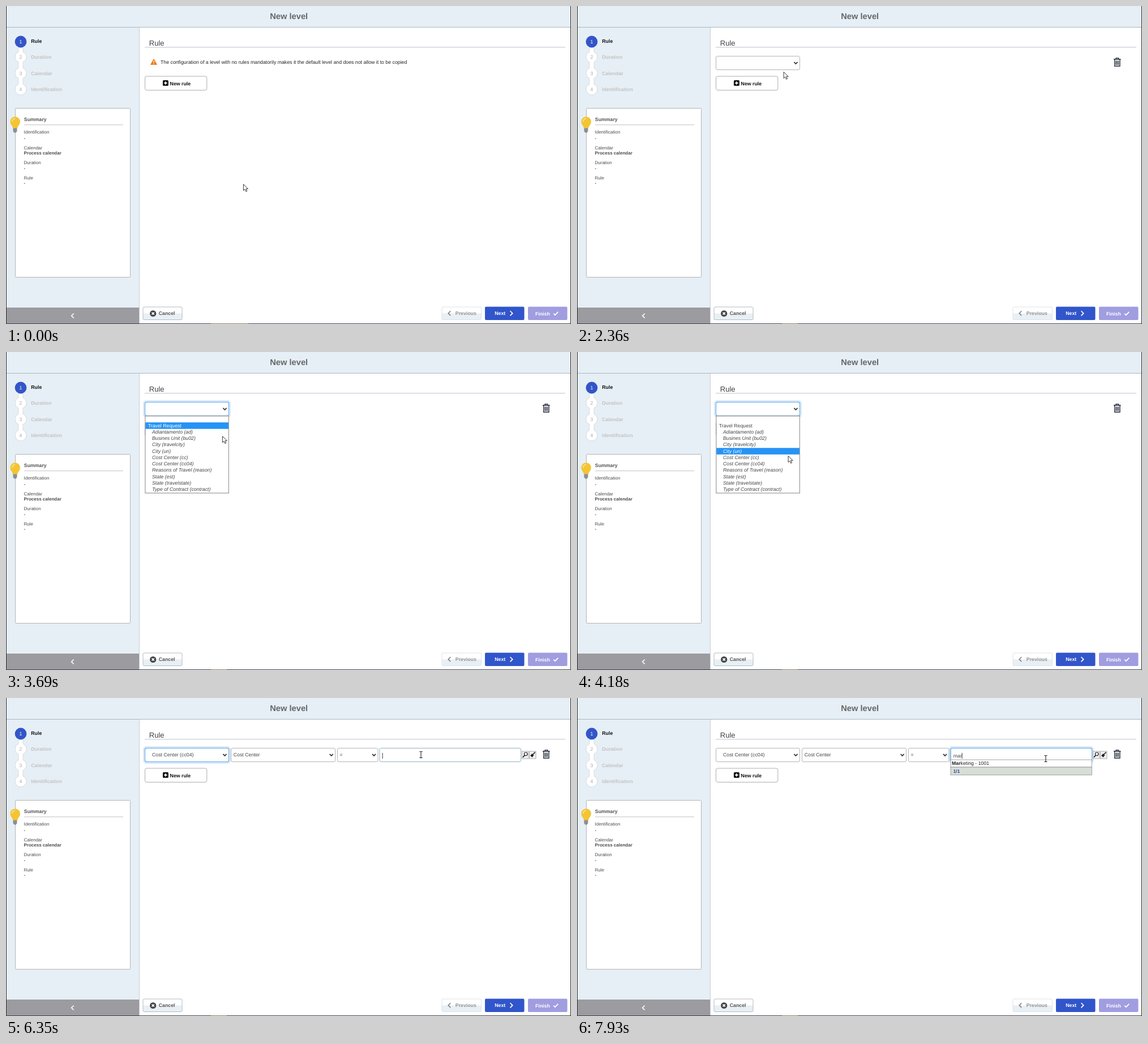
An HTML page for the animation above (7990 ms loop, 998 by 561 pixels).

```html
<!DOCTYPE html>
<html lang="en">
<head>
<meta charset="utf-8">
<title>New level</title>
<style>
  html, body { margin: 0; width: 100%; height: 100%; overflow: hidden; background: #fff; }
  svg { display: block; }
  text { font: 8.76px "Liberation Sans", Arial, sans-serif; fill: #444; text-rendering: geometricPrecision; white-space: pre; }
  .b { font-weight: bold; }
  .s { font-size: 8px; fill: #4c4c4c; }
  .off { fill: #c3c3c3; }
  .mid { text-anchor: middle; }
  .box { fill: #fff; stroke: #b4b4b4; }
  .line { fill: none; stroke-width: 1.7; }
  .ring { fill: none; stroke: #5fa8e8; }
  #list text { font-style: italic; }
</style>
</head>
<body>
<svg width="998" height="561" viewBox="0 0 998 561">
  <defs>
    <linearGradient id="soft" x2="0" y2="1">
      <stop offset=".48" stop-color="#fff"/><stop offset=".52" stop-color="#e8f0f6"/>
    </linearGradient>
    <path id="chev" class="line" d="M-3 -1.6L0 1.6L3 -1.6" stroke="#333"/>
    <g id="glow">
      <path id="arrow" d="M.4 .4V11.6L3 9.2L4.9 13.4L6.8 12.5L5 8.5H8.4Z" fill="#fff" stroke="#222" stroke-width=".9"/>
    </g>
  </defs>

  <!-- frame, header and sidebar -->
  <rect width="998" height="561" fill="#fff"/>
  <rect width="998" height="37" fill="#e6eff6"/>
  <rect y="38" width="235" height="495" fill="#e6eff6"/>
  <path d="M0 37.5H998" stroke="#a9b6c0"/>
  <path d="M235.5 38V560" stroke="#c6ced4"/>
  <text class="b mid" x="499.7" y="23" style="font-size:14.7px;fill:#666">New level</text>

  <g fill="#fff" stroke="#cdd3d8" stroke-width=".8">
    <circle cx="26" cy="90" r="10"/><circle cx="26" cy="118.5" r="10"/><circle cx="26" cy="147" r="10"/>
    <path d="M22 72V81M30 72V81M22 99V110M30 99V110M22 128V138M30 128V138"/>
    <path d="M22.5 72h7v10h-7zM22.5 98h7v12h-7zM22.5 127h7v12h-7z" stroke="none"/>
  </g>
  <circle cx="26" cy="63" r="10.4" fill="#3355c8"/>
  <g class="b">
    <text class="mid" x="26" y="66" style="fill:#fff">1</text>
    <text class="mid" x="26" y="93.3" style="fill:#aaa">2</text>
    <text class="mid" x="26" y="121.7" style="fill:#aaa">3</text>
    <text class="mid" x="26" y="150.2" style="fill:#aaa">4</text>
    <text class="b" x="44.3" y="65.4" style="fill:#111">Rule</text>
    <text class="b off" x="44.3" y="93.3">Duration</text>
    <text class="b off" x="44.3" y="121.7">Calendar</text>
    <text class="b off" x="44.3" y="150.2">Identification</text>
  </g>

  <rect class="box" x="16.5" y="180.5" width="203" height="298" rx="1"/>
  <path d="M32 209.7H207" stroke="#c2c2c2"/>
  <text class="b" x="31.8" y="203.3" style="fill:#555">Summary</text>
  <g>
    <text class="s" x="31.5" y="224.6">Identification</text>
    <text class="s b" x="31.5" y="235.5">-</text>
    <text class="s" x="31.5" y="253.2">Calendar</text>
    <text class="s b" x="31.5" y="262">Process calendar</text>
    <text class="s" x="31.5" y="279.3">Duration</text>
    <text class="s b" x="31.5" y="288.5">-</text>
    <text class="s" x="31.5" y="305.5">Rule</text>
    <text class="s b" x="31.5" y="314.8">-</text>
  </g>
  <path d="M12.5 214h7v7l-2 2.5h-3l-2-2.5z" fill="#8b8f94"/>
  <path d="M12 215.5C12 211 7.5 210 7.5 204a8.7 8.7 0 0 1 17.4 0C24.9 210 20.4 211 20.4 215.5Z" fill="#f3c433"/>
  <path d="M11 204a5.5 5.5 0 0 1 5 -5.5" fill="none" stroke="#fbe7a0" stroke-width="1.6"/>

  <rect x="0" y="532" width="235" height="28" fill="#9c9b9f"/>
  <path class="line" d="M119.7 542.5L115.7 546.5L119.7 550.5" stroke="#fff"/>

  <!-- page heading and footer buttons -->
  <text x="252.7" y="69.8" style="font-size:13.1px">Rule</text>
  <path d="M245 72.8H988" stroke="#bfc0d2"/>
  <rect x="242" y="531" width="69" height="22.5" rx="2" fill="url(#soft)" stroke="#b3bac1"/>
  <circle cx="259.7" cy="542.5" r="5.6" fill="#444"/>
  <path d="M257.6 540.4l4.2 4.2m0 -4.2l-4.2 4.2" stroke="#fff" stroke-width="1.5"/>
  <text class="b" x="269.8" y="545.3" style="fill:#555">Cancel</text>
  <rect x="770" y="531" width="69.5" height="22.5" rx="2" fill="url(#soft)" stroke="#dce3e8"/>
  <path class="line" d="M785.2 538.2L781.2 542.2L785.2 546.2" stroke="#888"/>
  <text class="b" x="793.8" y="545.3" style="fill:#929292">Previous</text>
  <rect x="846" y="530.5" width="69.5" height="23.5" rx="2" fill="#3155ca"/>
  <text class="b" x="863.3" y="545.3" style="fill:#fff">Next</text>
  <path class="line" d="M890.5 538L894.7 542.2L890.5 546.4" stroke="#fff"/>
  <rect x="922" y="530.5" width="69.5" height="23.5" rx="2" fill="#a09de0"/>
  <text class="b" x="935" y="545.7" style="fill:#fff">Finish</text>
  <path class="line" d="M967.2 542.6L969.9 545.2L975.2 539.6" stroke="#fff"/>

  <!-- warning -->
  <g id="warn">
    <path d="M261 94L266.2 103.2H255.8Z" fill="#ee7d1a" stroke="#ee7d1a" stroke-width="1.3" stroke-linejoin="round"/>
    <path d="M261 96.5V100M261 101.2V102.5" stroke="#fff" stroke-width="1.3"/>
    <text x="273" y="102.4" style="fill:#222">The configuration of a level with no rules mandatorily makes it the default level and does not allow it to be copied</text>
  </g>

  <!-- rule row -->
  <g id="row">
    <rect class="box" x="245.5" y="88.5" width="148" height="24" rx="2.5"/>
    <g id="selectRing" class="ring">
      <rect x="244" y="87" width="151" height="27" rx="4" stroke-opacity=".25" stroke-width="4"/>
      <rect x="245.5" y="88.5" width="148" height="24" rx="2.5"/>
    </g>
    <use href="#chev" x="386.5" y="100.5"/>
    <g fill="none" stroke="#1d2433" stroke-width="1.3">
      <path d="M948 94H960.5M952 93.5V91.8H956.6V93.5M949.6 94.5V106H959V94.5M952 96.5V104M954.3 96.5V104M956.6 96.5V104"/>
    </g>
  </g>
  <g id="fields">
    <text x="258" y="103.4">Cost Center (cc04)</text>
    <rect class="box" x="397.5" y="88.5" width="184" height="24" rx="2.5"/>
    <text x="401.8" y="103.4">Cost Center</text>
    <use href="#chev" x="574.7" y="100.5"/>
    <rect class="box" x="585.5" y="88.5" width="71.5" height="24" rx="2.5"/>
    <text x="589.5" y="103.2">=</text>
    <use href="#chev" x="650" y="100.5"/>
    <rect x="660" y="88.5" width="249.5" height="24" rx="2.5" fill="#fff" stroke="#92b3c0"/>
    <g id="inputRing" class="ring">
      <rect x="658.5" y="87" width="252.5" height="27" rx="4" stroke-opacity=".25" stroke-width="4"/>
      <rect x="660" y="88.5" width="249.5" height="24" rx="2.5"/>
    </g>
    <g fill="#f1f1f1" stroke="#999" stroke-width=".8">
      <rect x="911.4" y="94" width="11.6" height="13"/><rect x="924.4" y="94" width="11.6" height="13"/>
    </g>
    <circle cx="918.2" cy="98.8" r="2.8" fill="#fff" stroke="#222" stroke-width="1.2"/>
    <path d="M916.2 101L913 104.6" stroke="#222" stroke-width="1.8"/>
    <path d="M934.6 95.6L931 99.3" stroke="#222" stroke-width="1.6"/>
    <path d="M929.5 98L932.4 101L929.4 104.8L926 101.6Z" fill="#222"/>
    <text id="typed" x="664.8" y="104.7"></text>
    <path id="caret" d="M.5 96.8V107" stroke="#222" stroke-width=".9"/>
  </g>

  <g id="add">
    <rect id="addBox" x="245.5" y="124" width="109.3" height="24.5" rx="3" stroke="#adadad"/>
    <rect id="addIcon" x="277" y="131" width="9.8" height="9.8" rx="1.5"/>
    <path d="M281.9 133V138.8M279 135.9H284.8" stroke="#fff" stroke-width="1.6"/>
    <text id="addText" class="b" x="289.6" y="139.7">New rule</text>
  </g>

  <g id="list">
    <rect x="245.9" y="112.9" width="147.4" height="136" fill="#fff" stroke="#777" stroke-width=".9"/>
    <rect id="mark" x="246.3" width="146.6" height="11.5" fill="#2693f5"/>
  </g>

  <g id="hint">
    <rect x="660" y="109" width="249.3" height="13" fill="#fff" stroke="#999" stroke-width=".9"/>
    <rect x="660" y="122" width="249.3" height="13.8" fill="#d6ded6" stroke="#999" stroke-width=".9"/>
    <text x="662" y="118.2" style="fill:#222"><tspan class="b">Mar</tspan>keting - 1001</text>
    <text class="b" x="664.8" y="132" style="font-size:8.2px;fill:#33409a">1/1</text>
  </g>

  <!-- screen edges -->
  <path d="M.5 0V561M997.5 0V561" stroke="#26282c"/>
  <path d="M0 560.5H998" stroke="#3a4250"/>
  <path id="task" stroke="#8a7a62"/>

  <g id="cursor">
    <use id="arrowCur" href="#arrow"/>
    <path id="handCur" d="M-1.2 10.5V1.3C-1.2 -.5 1.5 -.5 1.5 1.3V6.2C2 5 4 5.2 4.1 6.6C4.8 5.6 6.5 6 6.6 7.3C7.4 6.6 8.9 7.1 8.9 8.6V12C8.9 14 7.6 15 7.4 17.3H.4C.2 15.2 -2.2 13.2 -3.7 10.2C-4.3 8.6 -2.6 7.8 -1.2 10.5ZM1.5 6.2V9.5M4.1 6.6V9.5M6.6 7.3V9.7" fill="#fff" stroke="#222" stroke-width=".9"/>
    <path id="beamCur" d="M-2.6 -5.5H-.8L0 -4.8L.8 -5.5H2.6M0 -4.8V4.8M-2.6 5.5H-.8L0 4.8L.8 5.5H2.6" fill="none" stroke="#222" stroke-width="1.1"/>
  </g>
</svg>
<script>
const LOOP = 7990, ROW = 11.27;
const $ = id => document.getElementById(id);
const show = (id, on) => $(id).style.display = on ? '' : 'none';
const clamp = x => Math.min(1, Math.max(0, x));
const fade = (t, from) => clamp((t - from) / 150);

const options = ['', 'Travel Request', 'Adiantamento (ad)', 'Busines Unit (bu02)', 'City (travelcity)', 'City (un)',
  'Cost Center (cc)', 'Cost Center (cc04)', 'Reasons of Travel (reason)', 'State (est)', 'State (travelstate)',
  'Type of Contract (contract)'];
const labels = options.map((name, i) => {
  const el = document.createElementNS('http://www.w3.org/2000/svg', 'text');
  el.textContent = name;
  el.setAttribute('x', i == 1 ? 250.8 : 258);
  el.setAttribute('y', 121.3 + i * ROW);
  if (i == 1) el.style.fontStyle = 'normal';
  return $('list').appendChild(el);
});

const smooth = p => p * p * (3 - 2 * p), flat = p => p, easeOut = p => 1 - (1 - p) ** 1.6;
// time, x, y, easing on the way there
const path = [
  [0, 419, 314], [100, 419, 314], [910, 321, 142, smooth], [940, 325, 139, flat],
  [1900, 325, 139], [2720, 392, 100, smooth], [2780, 389, 99, flat],
  [3000, 389, 99], [3690, 382, 148, smooth], [3810, 380, 160, flat], [4370, 369, 194.5, flat],
  [5110, 369, 194.5], [5200, 388, 194, flat], [5920, 722, 151, easeOut], [6320, 733, 100, smooth],
  [7900, 733, 100], [7901, 828, 107, flat], [LOOP, 828, 107]
];
const kinds = [[0, 'arrow'], [925, 'hand'], [2270, 'arrow'], [6210, 'beam'], [6510, ''], [7920, 'beam']];
const marks = [[0, 0], [3480, 1], [3720, 2], [3780, 3], [3960, 4], [4110, 5], [4230, 6], [4350, 7]];
const typing = [[0, ''], [6600, 'm'], [6750, 'ma'], [6870, 'mar']];

const at = (steps, t) => steps.filter(s => s[0] <= t).pop()[1];

function place(t) {
  const i = path.findIndex(p => p[0] > t), [t0, x0, y0] = path[i - 1], [t1, x1, y1, ease = flat] = path[i];
  const p = ease((t - t0) / (t1 - t0));
  return [x0 + (x1 - x0) * p, y0 + (y1 - y0) * p];
}

function draw(t) {
  show('warn', t < 1330);
  show('row', t >= 1330);
  show('fields', t >= 4800);
  show('list', t >= 2790 && t < 4800);
  show('hint', t >= 7200);
  $('selectRing').style.opacity = fade(t, 3020) * (1 - fade(t, 6500));
  $('inputRing').style.opacity = fade(t, 6500);
  $('task').setAttribute('d', `M362 560.5H${t < 940 ? 428 : 390}`);

  const hover = t >= 940 && t < 2270;
  $('addBox').style.fill = hover ? '#d6ded6' : '#fff';
  $('addIcon').style.fill = hover ? '#285b96' : '#000';
  $('addText').style.fill = hover ? '#285b96' : '#111';

  const mark = at(marks, t);
  $('mark').setAttribute('y', 112.9 + mark * ROW);
  labels.forEach((el, i) => el.style.fill = i == mark ? '#fff' : '#444');

  const typed = $('typed');
  typed.textContent = at(typing, t);
  show('caret', t >= 6330 && t < 7340 || t >= 7800);
  $('caret').setAttribute('transform', `translate(${664.6 + (typed.textContent ? typed.getComputedTextLength() : 0)} 0)`);

  const kind = at(kinds, t);
  for (const k of ['arrow', 'hand', 'beam']) show(k + 'Cur', k == kind);
  $('cursor').setAttribute('transform', `translate(${place(t)})`);
}

function tick() {
  draw(performance.now() % LOOP);
  requestAnimationFrame(tick);
}
tick();
</script>
</body>
</html>
```
